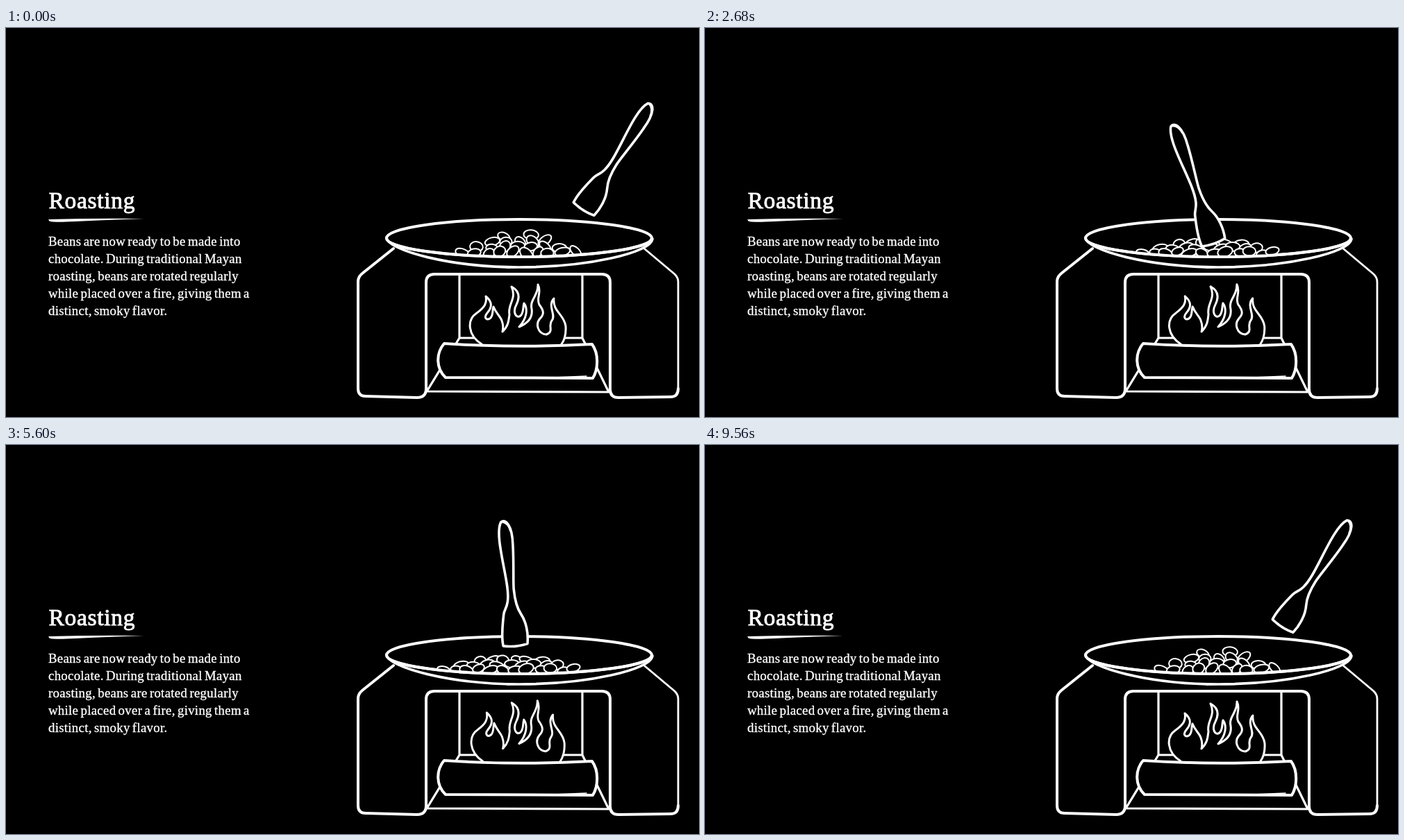
Recreate the animation shown at these times as an HTML page. Size 998 px wide and 561 px high, loop 9600 ms.

```html
<!DOCTYPE html>
<html lang="en">
<head>
<meta charset="utf-8">
<title>Roasting</title>
<style>
  html, body { margin: 0; width: 100%; height: 100%; overflow: hidden; background: #000; }
  svg { display: block; width: 100%; height: 100%; }
  path, ellipse { stroke: #fff; stroke-linecap: round; stroke-linejoin: round; }
  text { font: 18.8px "Liberation Serif", serif; letter-spacing: .3px; word-spacing: -1.7px;
    fill: #fff; stroke: #fff; stroke-width: .35px; }
  .title { font-size: 33.5px; letter-spacing: .7px; stroke-width: .9px; }
  .solid { fill: #fff; stroke: none; }
  .line { fill: none; }
  .thin { fill: none; stroke-width: 1.6; }
</style>
</head>
<body>
<svg viewBox="0 0 998 561" fill="#000" stroke-width="4">
  <defs><clipPath id="bowl"><path d="M540,200H940V303C930,340 550,340 540,303Z"/></clipPath></defs>

  <text class="title" x="61.500" y="260">Roasting</text>
  <path class="solid" d="M61,276Q130,274 199,275Q140,277 100,279T62,277.500Z"/>
  <g id="copy"></g>

  <!-- stove -->
  <path class="line" d="M558,318L513,354Q507,359 507,366V520Q507,531 518,531L592,533Q605,533 605,520V367Q605,355 617,355H858Q870,355 870,367V521Q870,533 882,533L957,532Q968,532 968,520"/>
  <path class="line" stroke-width="2.800" d="M968,520V366Q968,360 963,355L919,318"/>
  <path class="line" stroke-width="3.200" d="M653,357V447H830V357M653,447L606,524L868,525L830,447"/>

  <g id="fire" stroke-width="3">
    <path d="M685,456C665,443 663,421 678,411C689,403 693,397 691,387C702,396 699,404 693,411C687,418 693,423 698,418C702,413 700,408 702,402
      C706,412 712,416 714,422Q717,430 715,438C724,429 724,421 725,413C722,398 736,391 728,373C741,380 739,391 735,399C729,410 735,420 741,415C746,410 744,404 746,397
      C752,405 750,419 739,431C751,426 759,418 757,405C754,391 767,386 766,370C772,381 763,390 768,399C775,408 775,413 769,419C762,427 766,441 778,442
      C790,438 780,429 786,422C793,414 779,401 789,390C787,409 804,413 806,430Q807,446 800,456"/>
  </g>

  <!-- log -->
  <path d="M631,455Q737,462 844,456C854,470 853,492 845,505L633,504C619,491 619,469 631,455Z"/>
  <path class="thin" d="M765,505L836,502M848,462Q856,480 847,499"/>

  <!-- pan -->
  <path stroke-width="3.600" d="M548,302C550,321 640,345 739,345S929,324 931,304"/>
  <ellipse cx="739" cy="303" rx="191" ry="27"/>
  <g id="beans" clip-path="url(#bowl)" stroke-width="2"></g>
  <path class="line" d="M548,303A191,27 0 0 0 930,303"/>
  <path class="thin" d="M722,346L770,344M890,288Q931,294 931,304"/>

  <!-- handle end at the origin, blade 181 below -->
  <g id="spatula" stroke-width="3.600">
    <path d="M-4,2C-14,18 -5,65 -4,95S-11,125 -13,135S-20,165 -18,180Q0,184 17,180C20,165 18,148 12,137S5,110 5,100S9,62 10,36C12,8 3,-3 -4,2Z"/>
    <path class="thin" d="M-3,2Q6,4 8,16"/>
  </g>
  <g id="sparks"></g>
</svg>

<script>
const LOOP = 9600;
const $ = id => document.getElementById(id);
const add = (parent, tag, attrs = {}) => {
  const el = document.createElementNS("http://www.w3.org/2000/svg", tag);
  for (const key in attrs) el.setAttribute(key, attrs[key]);
  return parent.appendChild(el);
};
const show = (el, on) => el.setAttribute("visibility", on ? "visible" : "hidden");
const ease = k => (1 - Math.cos(Math.PI * k)) / 2;

let seed = 7;
const jitter = size => {
  seed = seed * 16807 % 2147483647;
  return (seed / 2147483647 - .5) * 2 * size;
};

["Beans are now ready to be made into", "chocolate. During traditional Mayan",
 "roasting, beans are rotated regularly", "while placed over a fire, giving them a",
 "distinct, smoky flavor."].forEach((line, i) =>
  add($("copy"), "text", { x: 61, y: 314 + 25 * i }).textContent = line);

// Rows of overlapping beans, from a narrow back row to a wide front row
function pile({ middle, top, rows, narrow, wide, tilt }) {
  const group = add($("beans"), "g");
  for (let row = 0; row < rows; row++) {
    const k = rows > 1 ? row / (rows - 1) : 1;
    const half = narrow + (wide - narrow) * k;
    const count = Math.max(2, Math.round(half / 8));
    for (let i = 0; i < count; i++) {
      const x = middle + half * (2 * i / (count - 1) - 1) + jitter(3);
      const y = top + (324 - top) * k + jitter(2.5);
      add(group, "ellipse", { rx: 10 + jitter(1.5), ry: 6.3 + jitter(1),
        transform: `translate(${x} ${y}) rotate(${jitter(tilt)})` });
    }
  }
  return group;
}
const heap = pile({ middle: 738, top: 299, rows: 4, narrow: 18, wide: 80, tilt: 55 });
const spread = pile({ middle: 726, top: 310, rows: 3, narrow: 44, wide: 94, tilt: 25 });
const stray = pile({ middle: 840, top: 324, rows: 1, narrow: 8, wide: 8, tilt: 20 });

// Blade centre and tilt at key times
const rest = [832, 262, 32.4], lifted = [965, 206, -35];
const poses = [
  [60, ...rest], [1000, 672, 304, 42], [1240, 624, 290, 51.6], [2680, 733, 310, -19],
  [3800, ...lifted], [4480, ...lifted], [6000, 690, 305, 0], [6720, 660, 304, 2.2],
  [7920, 755, 298, 4.7], [8900, ...rest]
];
function poseAt(t) {
  const next = poses.findIndex(p => p[0] > t);
  if (next < 1) return rest;
  const from = poses[next - 1], to = poses[next];
  const k = ease((t - from[0]) / (to[0] - from[0]));
  return from.map((v, i) => v + (to[i] - v) * k).slice(1);
}

// Sparks fly straight out of the pan: start time, angle from vertical
const sparks = [[765, 41], [1128, -15], [2100, 5], [3150, 8], [6100, -12], [7475, 29], [7530, -39], [8300, -6]]
  .map(([start, angle]) => ({ start, angle, el: add($("sparks"), "path", { class: "solid", d: "M0,-2.500L2,1.800H-2.200Z" }) }));

function draw() {
  const t = performance.now() % LOOP;

  const [x, y, tilt] = poseAt(t);
  $("spatula").setAttribute("transform", `translate(${x} ${y}) rotate(${tilt}) translate(0 -181)`);

  const heaped = t < 1040 || t >= 7500;
  show(heap, heaped);
  show(spread, !heaped);
  show(stray, t >= 3040 && t < 5600);

  const squeeze = ease(t / 1200);
  $("fire").setAttribute("transform",
    `translate(738 456) scale(${1 - .036 * squeeze} ${1 + .02 * squeeze}) translate(-738 -456)`);

  for (const { start, angle, el } of sparks) {
    show(el, t > start);
    el.setAttribute("transform", `translate(735 300) rotate(${angle}) translate(0 ${-.57 * (t - start)})`);
  }
  requestAnimationFrame(draw);
}
draw();
</script>
</body>
</html>
```
